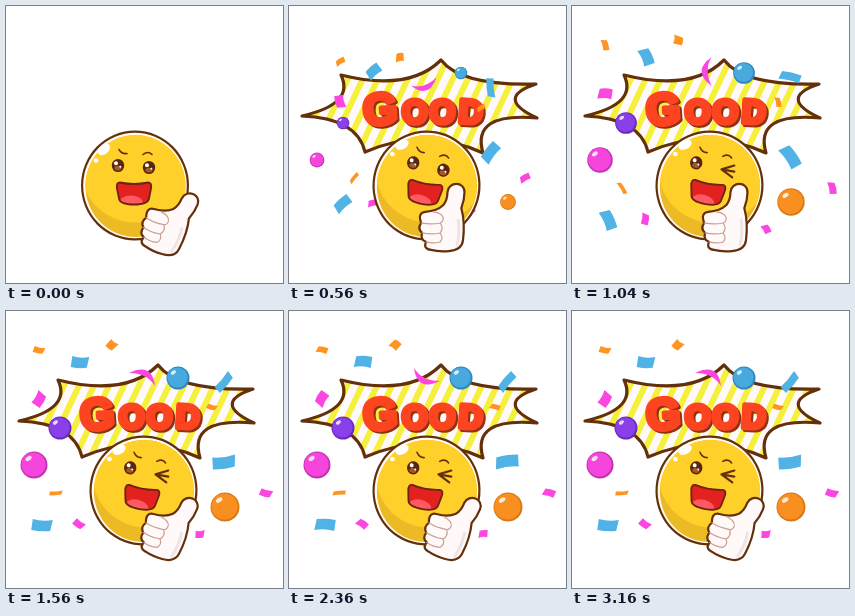
An HTML page with a canvas for the animation above (3200 ms loop, 277 by 277 pixels).

```html
<!DOCTYPE html>
<html lang="en">
<head>
<meta charset="utf-8">
<title>Good</title>
<style>
html, body { margin: 0; width: 100%; height: 100%; overflow: hidden; background: #fff; }
canvas { display: block; }
</style>
</head>
<body>
<canvas id="stage" width="277" height="277"></canvas>
<script>
const ctx = document.getElementById('stage').getContext('2d');
const LOOP = 3200, STEP = 40, TAU = Math.PI * 2;
const BROWN = '#64300b', BLUE = '#51b2e6', PINK = '#fb47e0', ORANGE = '#ff9422';

const clamp = v => Math.max(0, Math.min(1, v));
const easeOut = (u, power) => 1 - (1 - clamp(u)) ** power;
const backOut = u => { const v = clamp(u) - 1; return 1 + 3.2 * v ** 3 + 2.2 * v * v; };

function at(x, y, degrees, scale, draw) {
  ctx.save();
  ctx.translate(x, y);
  ctx.rotate(degrees * TAU / 360);
  ctx.scale(scale, scale);
  draw();
  ctx.restore();
}

function shape(path, fill, stroke, width = 2) {
  const p = new Path2D(path);
  if (fill) { ctx.fillStyle = fill; ctx.fill(p); }
  if (stroke) { ctx.strokeStyle = stroke; ctx.lineWidth = width; ctx.stroke(p); }
}

function oval(x, y, rx, ry, fill, tilt = 0) {
  ctx.beginPath();
  ctx.ellipse(x, y, rx, ry, tilt, 0, TAU);
  ctx.fillStyle = fill;
  ctx.fill();
}

const burst = 'M13 110Q66 98 52 69Q120 86 152 54Q172 80 247 78' +
  'Q205 92 248 112Q182 106 194 147Q136 120 76 146Q68 112 13 110Z';

function letter(char, x, y, size, tilt) {
  at(x, y, tilt, 1, () => {
    ctx.font = `bold ${size}px "Liberation Sans", Arial, sans-serif`;
    ctx.textAlign = 'center';
    ctx.lineWidth = 5;
    for (const [color, shift] of [['#8f3210', 2], ['#fd4420', 0]]) {
      ctx.strokeStyle = ctx.fillStyle = color;
      ctx.strokeText(char, shift, shift);
      ctx.fillText(char, shift, shift);
    }
  });
}

function bubble(t) {
  const scale = backOut((t - 80) / 400);
  if (t <= 80 || scale <= 0) return;
  at(131, 105, 0, scale, () => {
    ctx.translate(-131, -105);
    shape(burst, '#fff9fb');
    ctx.save();
    ctx.clip(new Path2D(burst));
    for (let x = -40; x < 270; x += 15) {
      shape(`M${x} 155L${x + 52} 45`, null, '#f5f03c', 6);
    }
    ctx.restore();
    shape(burst, null, BROWN, 3.2);
    letter('G', 92, 118, 44, -4);
    letter('O', 126, 117, 33, -2);
    letter('O', 153, 117, 33, 1);
    letter('D', 181, 117, 33, 4);
  });
}

// x, y, length, thickness, tilt, color
const strips = [
  [33, 39, 12, 6, 12, ORANGE], [106, 34, 10, 9, 35, ORANGE],
  [74, 51, 18, 11, 3, BLUE], [33, 88, 15, 10, -60, PINK],
  [218, 71, 22, 8, -50, BLUE], [206, 96, 11, 5, 15, ORANGE],
  [218, 151, 24, 12, -8, BLUE], [260, 182, 13, 7, 15, PINK],
  [194, 223, 10, 7, -5, PINK], [50, 182, 14, 4, -5, ORANGE],
  [73, 213, 12, 7, 35, PINK], [36, 214, 21, 11, 3, BLUE]
];
// x, y, radius, light, dark
const balls = [
  [172, 67, 11.5, '#48a9df', '#3088be'], [54, 117, 11.5, '#8a40e8', '#6a2abf'],
  [28, 154, 13.5, '#f545dc', '#c431b0'], [219, 196, 14.5, '#f98f20', '#d97814']
];

function confetti(t) {
  if (t <= 200) return;
  const spread = easeOut((t - 200) / 840, 3);
  const spin = (t - 1560) / 1600 * 360;
  const grow = easeOut((t - 200) / 1100, 2);
  const place = (x, y) => [131 + (x - 131) * spread, 129 + (y - 129) * spread];

  for (const [x, y, long, thick, tilt, color] of strips) {
    at(...place(x, y), tilt + spin, 0.5 + spread / 2, () => {
      const a = long / 2, b = thick / 2;
      shape(`M${1 - a} ${-b}Q0 ${-b * 0.6} ${a} ${-b}` +
        `L${a - 2} ${b}Q0 ${b * 1.3} ${-a} ${b}Z`, color);
    });
  }
  at(...place(137, 66), spin, 0.6 + spread * 0.4, () =>
    shape('M-14 -4Q9 -15 12 9Q4 -4 -14 -4Z', PINK));

  for (const [x, y, r, light, dark] of balls) {
    at(x, y, 0, grow, () => {
      oval(0, 0, r, r, dark);
      oval(-0.5, -0.5, r - 1.4, r - 1.4, light);
      oval(-r * 0.4, -r * 0.48, r * 0.25, r * 0.15, '#ffffffcc', -0.6);
    });
  }
}

function eye(x, y) {
  oval(x, y, 6.2, 6.6, '#5b260e');
  oval(x, y + 2.6, 3.6, 2.4, '#a45727');
  oval(x - 2, y - 2.2, 2, 2, '#fff');
  oval(x + 2.3, y + 1.2, 1, 1, '#fff');
}

function face(t) {
  const turn = easeOut(t / 400, 2);
  at(129 + 8.5 * turn, 179.5, 10 * turn, 1, () => {
    oval(0, 0, 54, 55, BROWN);
    oval(0, 0, 51.8, 52.8, '#fffbf0');
    oval(0.5, 0.5, 50, 51, '#ebba24');
    ctx.save();
    ctx.beginPath();
    ctx.ellipse(0.5, 0.5, 50, 51, 0, 0, TAU);
    ctx.clip();
    oval(1, -13, 54, 50, '#ffd02a');
    ctx.restore();
    oval(-31, -36, 7, 4.5, '#fff', -0.7);
    oval(-39, -25, 2.4, 2.2, '#fff');

    shape('M-16 -36Q-13 -31 -8 -32M8 -31Q13 -35 17 -31', null, BROWN, 1.6);
    eye(-17, -20);
    if (t < 800) eye(14, -18);
    else shape('M21 -24L9 -18L21 -12M9 -18H22', null, BROWN, 2.2);

    const mouth = 'M-15 -3Q-1 0 13 -3Q17 -3 16 3L14 13Q13 19 -1 19Q-15 19 -16 13L-18 3Q-19 -3 -15 -3Z';
    shape(mouth, '#e3221f');
    ctx.save();
    ctx.clip(new Path2D(mouth));
    oval(-4, 18, 12, 8, '#ff5a62');
    ctx.restore();
    shape(mouth, null, '#6b2410', 1.8);
  });
}

function hand(t) {
  const tilt = 5.5 + 16 * Math.cos(t / 800 * TAU);
  at(150, 236, tilt, 1, () => {
    shape('M-14 -30Q-2 -31 4 -37Q8 -42 8 -50C9 -61 25 -61 25 -50' +
      'Q25 -42 22 -34Q26 -20 24 -2Q23 8 10 9Q0 10 -8 8' +
      'Q-16 7 -13 0Q-19 -2 -17 -9Q-22 -13 -18 -19Q-22 -29 -14 -30Z',
      '#fff9fa', BROWN, 2.2);
    shape('M-18 -19Q-9 -17 1 -19M-17 -9Q-8 -7 1 -9M-13 0Q-6 2 1 0' +
      'M-6 -30Q3 -29 4 -24Q4 -20 1 -19Q5 -14 1 -9Q5 -4 1 0',
      null, '#c9a08f', 1.2);
    shape('M19 -22Q21 -9 18 3', null, '#efe4e4', 3);
  });
}

function draw(now) {
  const t = Math.floor(now % LOOP / STEP) * STEP;
  ctx.fillStyle = '#fff';
  ctx.fillRect(0, 0, 277, 277);
  ctx.lineJoin = ctx.lineCap = 'round';
  bubble(t);
  confetti(t);
  face(t);
  hand(t);
}

const start = performance.now();
function tick() {
  draw(performance.now() - start);
  requestAnimationFrame(tick);
}
tick();
</script>
</body>
</html>
```
